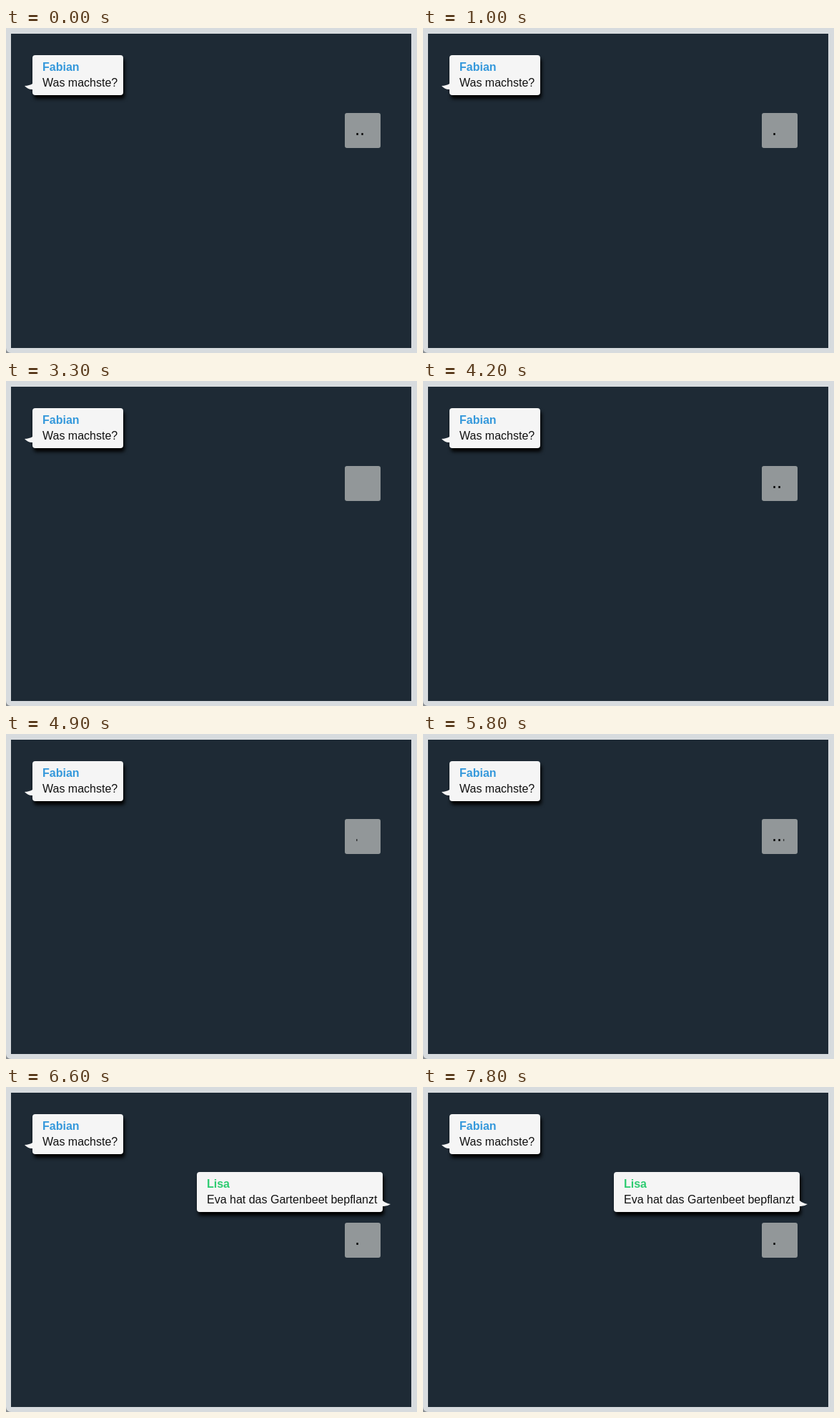
These frames come from a looping animation (575x455 px, 8000 ms). An HTML page with a canvas:

```html
<!DOCTYPE html>
<html lang="de">
<head>
<meta charset="utf-8">
<title>Chat</title>
<style>
  html, body { margin: 0; width: 100%; height: 100%; overflow: hidden; background: #d7dbde; }
  canvas { display: block; }
</style>
</head>
<body>
<canvas id="stage" width="575" height="455"></canvas>
<script>
const ctx = document.getElementById('stage').getContext('2d');

const LOOP = 8000;
const TICK = 100;          // the picture advances ten times a second
const REPLY_AT = 6600;
const DOT_CYCLE = 1360;
const DOT_START = 570;
const REVEAL_SPEED = 15.4; // px per second
const PAPER = '#f5f5f5';

function roundBox(x, y, w, h, r, color) {
  ctx.fillStyle = color;
  ctx.beginPath();
  ctx.roundRect(x, y, w, h, r);
  ctx.fill();
}

function label(text, x, y, color, weight) {
  ctx.font = weight + ' 16px Arial, "Liberation Sans", sans-serif';
  ctx.fillStyle = color;
  ctx.fillText(text, x, y);
}

function bubble(x, y, w, name, color, message) {
  ctx.save();
  ctx.shadowColor = '#000';
  ctx.shadowBlur = 5;
  ctx.shadowOffsetX = 2;
  ctx.shadowOffsetY = 5;
  roundBox(x, y, w, 56, 4, PAPER);
  ctx.restore();
  label(name, x + 14, y + 22, color, 'bold');
  label(message, x + 14, y + 44, '#111', 'normal');
}

// Curved tail from a bubble edge; dir is -1 for left, 1 for right.
function tail(x, y, dir, tipY) {
  ctx.fillStyle = PAPER;
  ctx.beginPath();
  ctx.moveTo(x, y);
  ctx.quadraticCurveTo(x + dir * 4, (y + tipY) / 2 + 1, x + dir * 11, tipY);
  ctx.quadraticCurveTo(x + dir * 6, y + 8.5, x, y + 8);
  ctx.fill();
}

function typing(x, y, t) {
  roundBox(x, y, 50, 49, 3, '#929799');
  const phase = (t - DOT_START + DOT_CYCLE) % DOT_CYCLE;
  const edge = x + 13.5 + REVEAL_SPEED * phase / 1000;
  ctx.fillStyle = '#0c0c0c';
  for (let i = 0; i < 3; i++) {
    const left = x + 16.3 + 7 * i;
    const width = Math.min(2.5, edge - left);
    if (width > 0) ctx.fillRect(left, y + 28, width, 3);
  }
}

function frame() {
  ctx.fillStyle = '#8b9094';
  ctx.fillRect(0, 0, 575, 455);
  roundBox(0, 0, 575, 455, [0, 0, 0, 7], '#d7dbde');
  ctx.fillStyle = '#1e2a35';
  ctx.fillRect(7, 8, 560, 440);
}

function draw(t) {
  frame();
  bubble(37, 38, 127, 'Fabian', '#3498db', 'Was machste?');
  tail(37, 78, -1, 81);
  const replied = t >= REPLY_AT;
  if (replied) {
    bubble(267, 119, 260, 'Lisa', '#2ecc71', 'Eva hat das Gartenbeet bepflanzt');
    tail(527, 159, 1, 164);
  }
  typing(474, replied ? 190 : 119, t);
}

const start = performance.now();
function loop() {
  const t = (performance.now() - start) % LOOP;
  draw(Math.floor(t / TICK) * TICK);
  requestAnimationFrame(loop);
}
loop();
</script>
</body>
</html>
```
